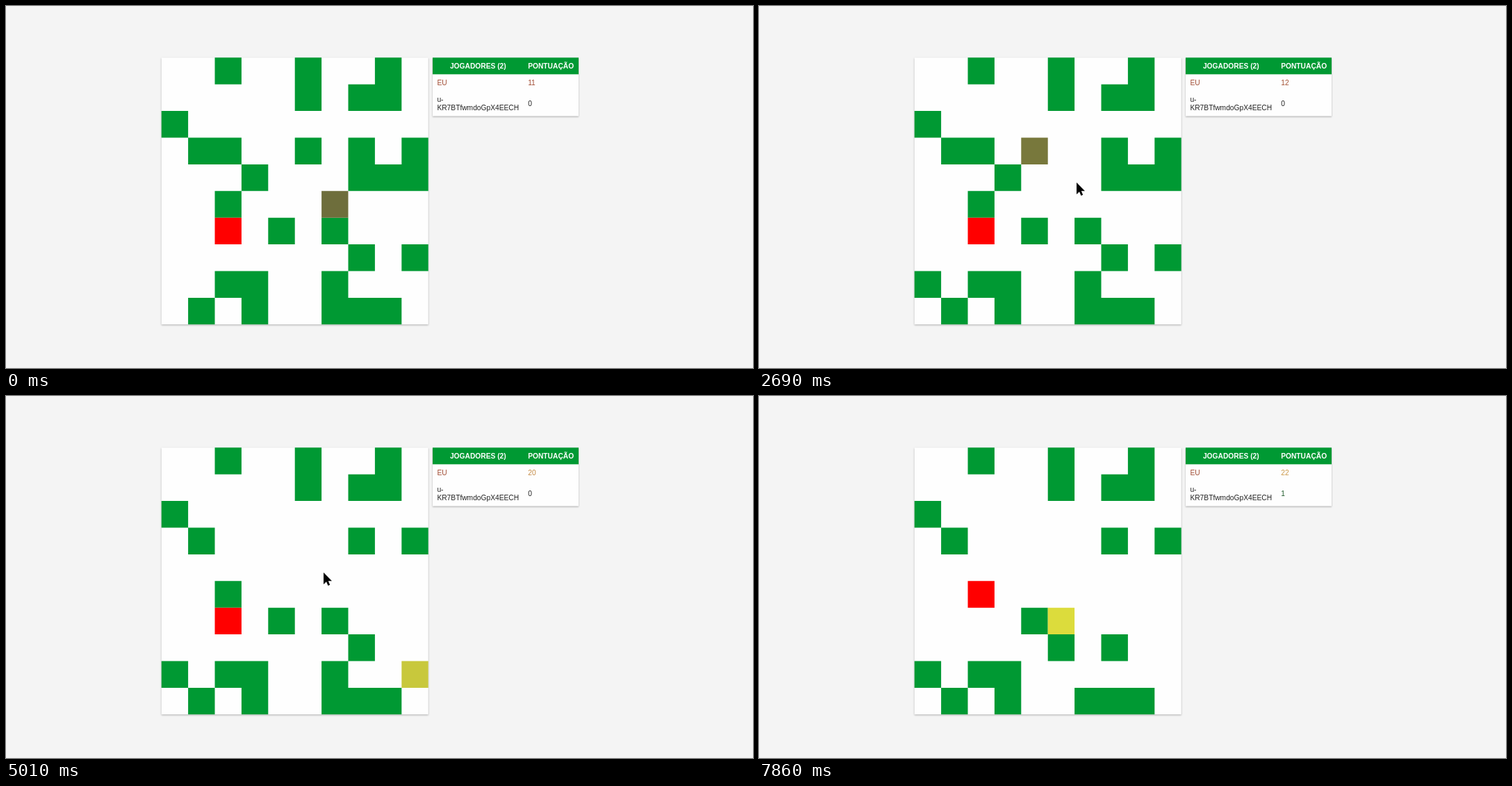
Write an HTML page that moves like this. It is 1075x521 px and loops after 7990 ms.

```html
<!DOCTYPE html>
<html lang="pt">
<head>
<meta charset="utf-8">
<title>Jogo</title>
<style>
  html, body { margin: 0; width: 100%; height: 100%; overflow: hidden; background: #f4f4f4; }
  svg { display: block; width: 1075px; height: 521px; }
  text { font: 10.24px Arial, "Liberation Sans", sans-serif; fill: #222; }
  .head { font-weight: bold; fill: #fff; }
  .me { fill: rgb(160, 75, 50); }
  .card { fill: #fefefe; filter: drop-shadow(0 1px 1px rgba(0, 0, 0, .3)); }
</style>
</head>
<body>
<svg viewBox="0 0 1075 521">
  <rect class="card" x="223.7" y="74.3" width="384" height="384"/>
  <path id="fruits" fill="#009933"/>
  <path id="rival" fill="#f00"/>
  <path id="player"/>

  <rect class="card" x="614" y="74.3" width="210" height="84.2"/>
  <rect x="614" y="74.3" width="210" height="24" fill="#009933"/>
  <text class="head" x="679.3" y="89.7" text-anchor="middle">JOGADORES (2)</text>
  <text class="head" x="751.2" y="89.7">PONTUAÇÃO</text>
  <text class="me" x="620.4" y="114">EU</text>
  <text id="score" x="751.2" y="114"></text>
  <text x="620.4" y="138">u-</text>
  <text x="620.4" y="149.8">KR7BTfwmdoGpX4EECH</text>
  <text id="rivalScore" x="751.2" y="144"></text>

  <circle id="click" cx="457" cy="254" r="8" fill="#ff0" fill-opacity=".47"/>
  <path id="cursor" d="M0 0V17L4 13.2 6.5 19 9.2 17.8 6.8 12.2H12Z"
        stroke="#fff" stroke-width="1" paint-order="stroke"/>
</svg>
<script>
const LOOP = 7990, CELL = 38.4, LEFT = 223.7, TOP = 74.3;
const $ = id => document.getElementById(id);

// Each digit is the number of fruits stacked on that cell.
const GRID = [
  "..1..1..1.",
  ".....1.11.",
  "1.........",
  ".11..1.1.1",
  "...1...221",
  "..1.......",
  "....1.1...",
  ".......1.1",
  "..11..1...",
  ".1.1..111."
];
const SPAWNS = [[1910, 0, 8], [7860, 5, 7]];
const RIVAL_MOVE = 7860;

const STEPS = "UULLLLDRRRRRRRDDDDLLLUUL";
const TIMES = [1990, 2370, 2540, 2690, 2920, 3070, 3220, 3470, 3620, 3690, 3940, 4090,
               4150, 4400, 4630, 4780, 4860, 5010, 5240, 5540, 5640, 5800, 5880, 6130];
const DIRS = { U: [0, -1], D: [0, 1], L: [-1, 0], R: [1, 0] };

// Pointer samples: time, x, y; the position holds until the next one.
const APPROACH = [0, .2, .48, .7, .87, .96, 1];
const POINTER = [
  ...APPROACH.map((k, i) => [70 + Math.floor(i * 71.7), 917 - 460 * k, 466 - 212 * k]),
  [6590, 330, 215], [6660, 140, 159]
];
const POINTER_GONE = 6730;

const cellPath = (c, r) =>
  `M${LEFT + c * CELL} ${TOP + r * CELL}h${CELL}v${CELL}h${-CELL}z`;

function stateAt(t) {
  const grid = GRID.map(row => [...row].map(n => +n || 0));
  for (const [at, c, r] of SPAWNS) if (t >= at) grid[r][c] = 1;

  let x = 6, y = 5, score = 11;
  TIMES.forEach((at, i) => {
    if (t < at) return;
    x += DIRS[STEPS[i]][0];
    y += DIRS[STEPS[i]][1];
    score += grid[y][x];
    grid[y][x] = 0;
  });

  const rivalY = t < RIVAL_MOVE ? 6 : 5;
  const rivalScore = grid[rivalY][2];
  grid[rivalY][2] = 0;
  return { grid, x, y, score, rivalY, rivalScore };
}

function draw(t) {
  const s = stateAt(t), gain = s.score - 11;
  $("fruits").setAttribute("d", s.grid.map((row, r) =>
    row.map((n, c) => n ? cellPath(c, r) : "").join("")).join(""));
  $("player").setAttribute("d", cellPath(s.x, s.y));
  $("player").style.fill = `rgb(${s.score * 10}, ${s.score * 10}, 60)`;
  $("rival").setAttribute("d", cellPath(2, s.rivalY));

  $("score").textContent = s.score;
  $("score").style.fill = `rgb(${160 + 4 * gain}, ${75 + 7 * gain}, ${50 + 2 * gain})`;
  $("rivalScore").textContent = s.rivalScore;
  $("rivalScore").style.fill = s.rivalScore ? "#1f5a2b" : "#222";

  const at = t < POINTER_GONE && POINTER.filter(p => p[0] <= t).pop();
  $("cursor").style.display = at ? "" : "none";
  if (at) $("cursor").setAttribute("transform", `translate(${at[1]} ${at[2]})`);
  $("click").style.display = t >= 1130 && t < 1300 ? "" : "none";
}

const start = performance.now();
function frame() {
  draw((performance.now() - start) % LOOP);
  requestAnimationFrame(frame);
}
frame();
</script>
</body>
</html>
```
